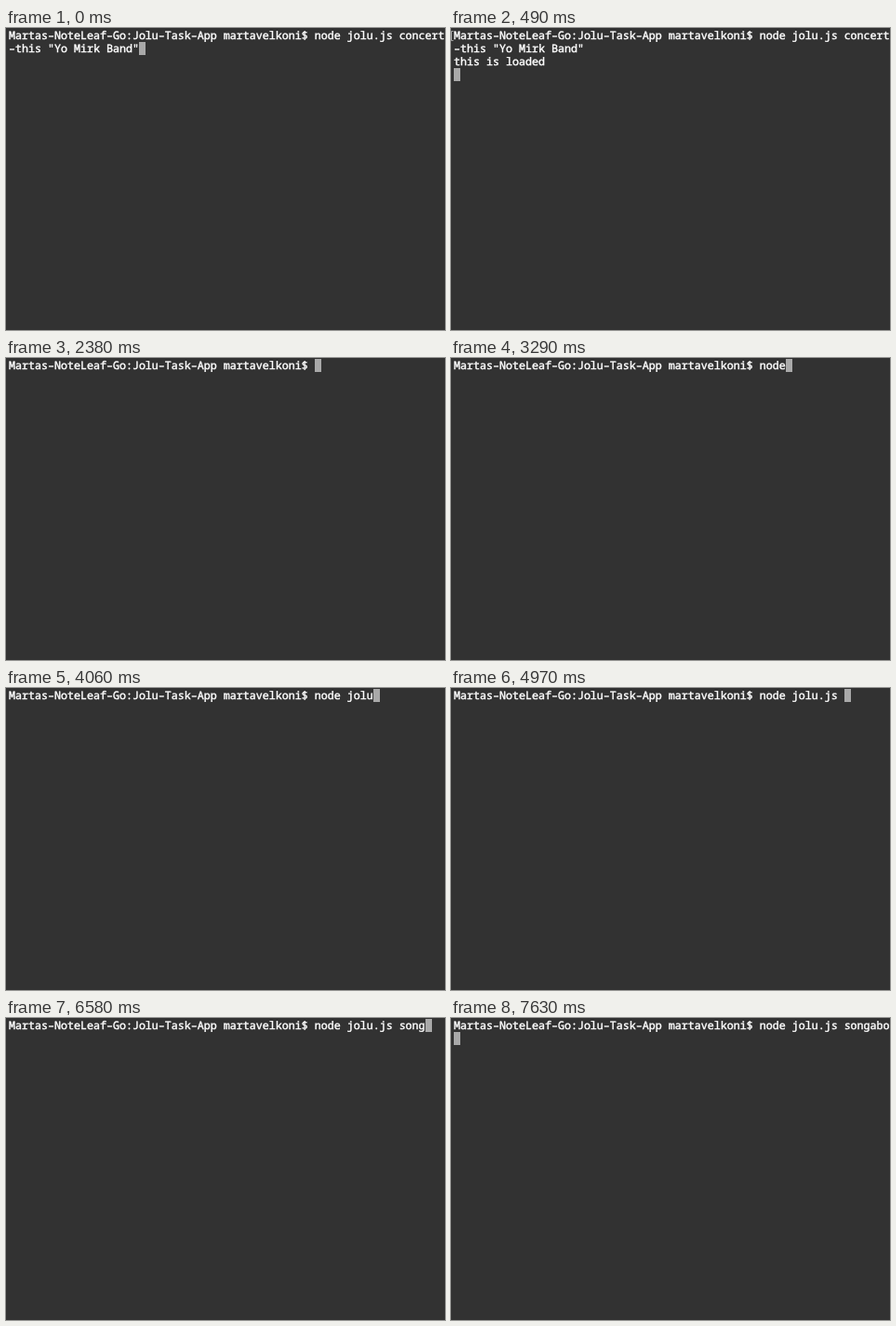
Recreate the animation shown at these times as an HTML page. Size 472 by 324 pixels, loop 8000 ms.

```html
<!DOCTYPE html>
<html lang="en">
<head>
<meta charset="utf-8">
<title>Terminal</title>
<style>
  html, body { margin: 0; width: 100%; height: 100%; overflow: hidden; background: #323232; }
  svg { display: block; }
  text {
    font: 500 11.667px "Noto Sans Mono", "DejaVu Sans Mono", monospace;
    fill: #fff;
    stroke: #fff;
    stroke-width: .45px;
    white-space: pre;
    text-rendering: geometricPrecision;
    font-variant-ligatures: none;
  }
</style>
</head>
<body>
<svg id="stage" width="472" height="324" viewBox="0 0 472 324">
  <rect width="472" height="324" fill="#323232"/>
  <path id="mark" d="M2.5 3.5H.5V13.5H2.5" fill="none" stroke="#a6a6a6"/>
  <g id="lines"></g>
  <rect id="cursor" width="7" height="14" fill="#a9a9a9"/>
</svg>
<script>
const LOOP = 8000, COLS = 67, CELL = 7, ROW = 14, LEFT = 3, TOP = 1;
const SVG = "http://www.w3.org/2000/svg";
const $ = id => document.getElementById(id);

const RULE = "rule";
const PROMPT = "Martas–NoteLeaf–Go:Jolu–Task–App martavelkoni$ ";
const COMMAND = "node jolu.js songabo";
const FIRST = [PROMPT + "node jolu.js concert", "–this \"Yo Mirk Band\""];
const EVENTS = [
  ["Brindlemor Heather Park", "Atlanta", "09/07/2019"],
  ["Ost Vel Fairgrounds", "Ost Vel", "09/13/2019"],
  ["Hartwen Glen Field House", "Chicago", "09/14/2019"],
  ["Mopsy Wick Live", "Bristow", "09/27/2019"],
  ["The Kelp Foundry", "Dallas", "10/04/2019"]
];
const LOADED = [...FIRST, "this is loaded"];
const RESULTS = LOADED.concat(EVENTS.flatMap(([venue, city, date]) => [
  RULE, "Venue Name: " + venue, "Location of venue: " + city, "Date of event: " + date
]));

// One time per typed character
const KEYS = [3010, 3010, 3150, 3290, 3500, 3570, 3640, 3780, 4060, 4480,
  4620, 4830, 4970, 6020, 6090, 6160, 6580, 6720, 6860, 7630];

function screenAt(t) {
  if (t < 70) return { lines: FIRST, row: 1, col: FIRST[1].length };
  if (t < 490) return { lines: FIRST, row: 2, col: 0, mark: true };
  if (t < 1400) return { lines: LOADED, row: 3, col: 0, mark: true };
  if (t < 2380) return { lines: RESULTS, row: 23, col: PROMPT.length, mark: true };
  const typed = KEYS.filter(k => t >= k).length;
  const end = PROMPT.length + typed;
  return {
    lines: [PROMPT + COMMAND.slice(0, typed)],
    row: Math.floor(end / COLS),
    col: end % COLS
  };
}

function make(tag, attrs) {
  const el = document.createElementNS(SVG, tag);
  for (const name in attrs) el.setAttribute(name, attrs[name]);
  return el;
}

function makeLine(line, row) {
  const y = TOP + row * ROW;
  if (line === RULE) {
    return make("path", {
      d: `M${LEFT + 0.5} ${y + 7}H472`, stroke: "#e8e8e8",
      "stroke-width": 1.2, "stroke-dasharray": "6 1"
    });
  }
  const el = make("text", { x: LEFT, y: y + 11 });
  el.textContent = line;
  return el;
}

let shown = "";
function draw(t) {
  const s = screenAt(t);
  const key = s.lines.join("\n");
  if (key !== shown) {
    $("lines").replaceChildren(...s.lines.map(makeLine));
    shown = key;
  }
  $("mark").setAttribute("visibility", s.mark ? "visible" : "hidden");
  $("cursor").setAttribute("x", LEFT + s.col * CELL);
  $("cursor").setAttribute("y", TOP + s.row * ROW);
}

let start;
function tick(now) {
  start ??= now;
  draw((now - start) % LOOP);
  requestAnimationFrame(tick);
}
draw(0);
requestAnimationFrame(tick);
</script>
</body>
</html>
```
